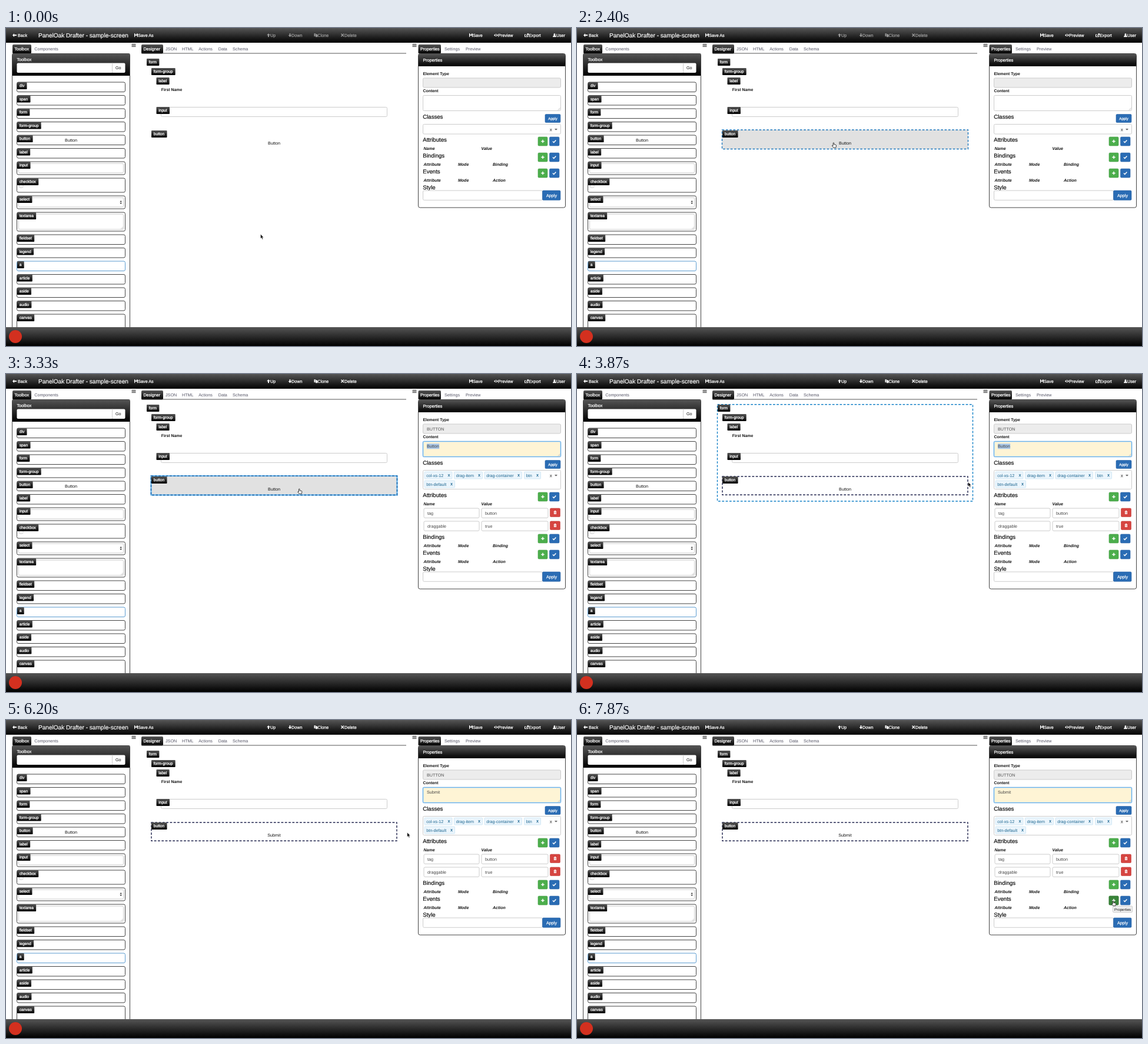
Recreate the animation shown at these times as an HTML page. Size 960 by 540 pixels, loop 8 s.

```html
<!DOCTYPE html>
<html lang="en">
<head>
<meta charset="utf-8">
<title>Screen designer</title>
<style>
html, body { margin: 0; width: 100%; height: 100%; overflow: hidden; background: #fff; }
svg { display: block; width: 960px; height: 540px; }
text { font: 7.2px "Liberation Sans", Arial, sans-serif; fill: currentColor; text-rendering: geometricPrecision; white-space: pre; }
.m { stroke: currentColor; stroke-width: .25px; }
.b { font-weight: bold; font-size: 6.9px; }
.i { font-weight: bold; font-style: italic; font-size: 7px; }
.h { font-size: 9.6px; stroke: currentColor; stroke-width: .2px; }
.t { font-size: 10.08px; stroke: currentColor; stroke-width: .2px; }
.s { font-size: 6.7px; stroke: currentColor; stroke-width: .28px; }
.tip { font-size: 6.2px; }
.mid { text-anchor: middle; }
</style>
</head>
<body>
<svg id="stage" viewBox="0 0 960 540" color="#111"></svg>
<script>
const LOOP = 8000, STEP = 1000 / 15;
const stage = document.getElementById('stage');
const pen = document.createElement('canvas').getContext('2d');
pen.font = '6.7px "Liberation Sans", Arial, sans-serif';

// Drawing helpers that return markup
const text = (x, y, s, cls = '', color = '') =>
  `<text x="${x}" y="${y}" class="${cls}"${color && ` color="${color}"`}>${s}</text>`;
const box = (x, y, x2, y2, fill, line = 'none', r = 0, more = '') =>
  `<rect x="${x}" y="${y}" width="${x2 - x}" height="${y2 - y}" fill="${fill}" stroke="${line}" rx="${r}" ${more}/>`;
const path = (d, x = 0, y = 0, more = '') => `<path d="${d}" transform="translate(${x} ${y})" ${more}/>`;
const group = (id, body, more = '') => `<g id="${id}" ${more}>${body}</g>`;
const field = (x, y, x2, y2, fill = '#fff') => box(x, y, x2, y2, fill, '#ccc', 2);
const grip = (x, y) => path('M0 4L4 0M2 4L4 2', x, y, 'stroke="#aaa" stroke-width=".6"');
const badge = (x, y, s) =>
  box(x, y, x + pen.measureText(s).width + 8, y + 12, 'url(#dark)', 'none', 1) + text(x + 3.7, y + 8.2, s, 's', '#fff');

const icons = {
  back: 'M0 3L3 0V2H7V4H3V6Z',
  save: 'M0 0H5L6 1V6H0ZM1.5 0V2H4V0ZM1.2 3.5V6H4.8V3.5Z',
  up: 'M3 0L6 3H4V6H2V3H0Z',
  down: 'M3 6L0 3H2V0H4V3H6Z',
  clone: 'M0 0H2.5V1H2V5H0ZM2.6 1H4.6L6 2.5V6H2.6Z',
  remove: 'M1 0L2.8 1.8 4.6 0 5.6 1 3.8 2.8 5.6 4.6 4.6 5.6 2.8 3.8 1 5.6 0 4.6 1.8 2.8 0 1Z',
  eye: 'M0 3Q3.5 -1 7 3Q3.5 7 0 3ZM2.2 3A1.3 1.3 0 0 0 4.8 3A1.3 1.3 0 0 0 2.2 3Z',
  share: 'M0 1.5H2.5L2 2.5H1V5H5V4L6 3V6H0ZM4 0H7V3L6 2 3.5 4.3 2.6 3.5 5 1Z',
  user: 'M3 0A1.6 1.7 0 0 1 4 3Q6 4 6 6H0Q0 4 2 3A1.6 1.7 0 0 1 3 0Z',
  trash: 'M0 1H1.5V0H3.5V1H5V1.8H0ZM.5 2.2H4.5V6H.5ZM1.5 3V5.3H2V3ZM3 3V5.3H3.5V3Z'
};
const icon = (name, x, y = 9.3) => path(icons[name], x, y, 'fill="currentColor" fill-rule="evenodd"');
const tool = (name, x, label, tx) => icon(name, x) + text(tx, 15, label, 'm');
const menu = x => path('M0 .5H7M0 2.5H7M0 4.5H7', x, 27, 'stroke="#333"');
const tab = (x, x2, label) => box(x, 28, x2, 43.5, 'url(#dark)', 'none', 2) + text(x + 3.4, 38, label, 'm', '#fff');
const tabs = list => list.map(([x, s]) => text(x, 38, s, '', '#556')).join('');

function chrome() {
  return box(0, 0, 960, 25, 'url(#dark)') + box(0, 508, 960, 540, 'url(#dark)') +
    '<circle cx="16" cy="524" r="11" fill="#d3301f"/>' +
    group('head', tool('back', 11, 'Back', 20) + text(55, 16, 'PanelOak Drafter - sample-screen', 't') +
      tool('save', 218, 'Save As', 224.3) + tool('save', 787, 'Save', 793.3) + tool('eye', 829, 'Preview', 836) +
      tool('share', 881, 'Export', 888) + tool('user', 929, 'User', 935), 'color="#fff"') +
    group('edit', tool('up', 443, 'Up', 449) + tool('down', 479.5, 'Down', 485) +
      tool('clone', 523.5, 'Clone', 529.5) + tool('remove', 569, 'Delete', 575)) +
    menu(213.5) + menu(690.5);
}

function toolbox() {
  const rows = [['div', 92], ['span', 114.5], ['form', 137], ['form-group', 159.5], ['button', 182], ['label', 204.5],
    ['input', 227, 22], ['checkbox', 255, 24], ['select', 285, 22], ['textarea', 313, 32], ['fieldset', 351],
    ['legend', 373.5], ['a', 396], ['article', 418.5], ['aside', 441], ['audio', 463.5], ['canvas', 486, 30]];
  const inner = {
    button: text(110.5, 193, 'Button', 'mid'),
    input: field(21.5, 230, 199.5, 246),
    checkbox: box(22.5, 265, 29, 271, '#fff', '#ccc', 1.5),
    select: field(21.5, 288, 199.5, 304) + path('M0 2.3L1.7 0 3.4 2.3ZM0 3.7L1.7 6 3.4 3.7Z', 193.5, 293, 'fill="#222"'),
    textarea: field(21.5, 316, 199.5, 342) + grip(195, 337.5)
  };
  return tab(11, 43, 'Toolbox') + tabs([[48.2, 'Components']]) +
    path('M10.5 508V45.5Q10.5 43.5 12.5 43.5H208.5Q210.5 43.5 210.5 45.5V508', 0, 0, 'fill="none" stroke="#444"') +
    box(11, 43.5, 210, 81, 'url(#dark)') + text(18.5, 56, 'Toolbox', 'm', '#fff') +
    box(18.5, 59.5, 202.5, 76, '#fff', 'none', 2) + path('M180.5 59.5V76', 0, 0, 'stroke="#ccc"') + text(186, 70.3, 'Go') +
    '<g clip-path="url(#body)">' + rows.map(([name, y, h = 16.5]) =>
      box(18.5, y, 202.5, y + h, '#fff', name === 'a' ? '#5b9bd0' : '#444', 2.5) + (inner[name] || '') +
      badge(19, y, name)).join('') + '</g>';
}

function designer() {
  const area = 'stroke-width="1.4" stroke-dasharray="3.8 2.5"';
  return tab(230, 267, 'Designer') +
    tabs([[271, 'JSON'], [299, 'HTML'], [327.3, 'Actions'], [360.7, 'Data'], [385, 'Schema']]) +
    path('M230 43H680', 0, 0, 'stroke="#555"') +
    group('formHover', box(238.5, 51.8, 672.5, 216, 'none', '#1682c8', 0, area)) +
    group('hover', box(246.5, 173, 664.5, 205.5, '#e1e1e1') + box(246.5, 173, 664.5, 205.5, 'none', '#1f78bd', 0, area)) +
    group('focus', box(246.5, 173, 664.5, 205.5, 'none', '#62b5f2', 0, 'stroke-width="2"') +
      box(246.5, 173, 664.5, 205.5, 'none', '#1f66a5', 0, area)) +
    group('picked', box(247, 174, 664, 205.3, 'none', '#22264f', 0, area)) +
    badge(239, 52, 'form') + badge(247, 68, 'form-group') + badge(255.5, 84, 'label') +
    text(263.7, 106.5, 'First Name', 'b') + field(263.5, 134.5, 647.5, 150.5) + badge(255.5, 134, 'input') +
    badge(247, 174, 'button') + `<text id="label" x="455.5" y="198" class="mid"></text>`;
}

const blue = (x, y, x2, y2) => box(x, y, x2, y2, '#2a6cb4', '#2560a3', 1.5, 'stroke-width=".6"');
function pair(y) {
  return box(904, y, 920, y + 15, '#4cae4c', '#449d44', 1.5, 'stroke-width=".6"') +
    path('M-2.7 0H2.7M0 -2.7V2.7', 912, y + 7.4, 'stroke="#fff" stroke-width="1.5"') +
    blue(923.5, y, 940, y + 15) +
    path('M-2.6 0L-.8 2 2.8 -2', 931.6, y + 7.4, 'stroke="#fff" stroke-width="1.5" fill="none"');
}
function section(y, title, heads) {
  return text(708.3, y, title, 'h') + pair(y - 8) +
    heads.map(([x, s]) => text(x, y + 14, s, 'i')).join('');
}
const chip = (x, y, x2, s) => box(x, y, x2, y + 12, '#ebf5fc', '#c5e1f3', 1, 'stroke-width=".7"') +
  text(x + 3.2, y + 8.5, s, '', '#1b658f') + text(x2 - 7.3, y + 8.3, 'x', 'm', '#1b658f');
const attr = (y, name, value) => field(710, y, 804, y + 16.3) + field(808, y, 921, y + 16.3) +
  text(716, y + 10.8, name, '', '#444') + text(814, y + 10.8, value, '', '#444') +
  box(924.5, y, 941.5, y + 14.5, '#d64541', '#c23a36', 1.5, 'stroke-width=".6"') +
  `<g color="#fff">${icon('trash', 930.5, y + 4)}</g>`;

function panel(full) {
  const a = full ? 16 : 0, b = full ? 60 : 0;
  const cols = last => [[709.5, 'Attribute'], [768, 'Mode'], [827, last]];
  return box(700.5, 43.5, 950.5, 305 + b, '#fff', '#444', 3) + box(701, 44, 950, 65, 'url(#dark)') +
    text(708.5, 57, 'Properties', 'm', '#fff') +
    text(708.5, 79.5, 'Element Type', 'b') + field(708.5, 85, 942.5, 101, '#ececec') +
    text(708.5, 109, 'Content', 'b') +
    (full ? box(708.5, 114.5, 942.5, 140.5, '#fef4d5', '#bcdcf5', 2, 'stroke-width="2.2"') +
      box(708.5, 114.5, 942.5, 140.5, 'none', '#66afe9', 2) : field(708.5, 114.5, 942.5, 140.5)) + grip(937.5, 135.5) +
    text(708.3, 154.3, 'Classes', 'h') + blue(916, 146.5, 942, 160.5) + text(929, 156, 'Apply', 'mid tip m', '#fff') +
    field(708.5, 163.5, 942.5, full ? 195.5 : 180) + text(924, 175, 'x', 'm', '#555') +
    path('M0 0H5L2.5 2.7Z', 932, 171, 'fill="#666"') +
    section(193 + a, 'Attributes', [[709.5, 'Name'], [807.5, 'Value']]) +
    section(220 + b, 'Bindings', cols('Binding')) + section(247 + b, 'Events', cols('Action')) +
    text(708.3, 274 + b, 'Style', 'h') + field(708.5, 276 + b, 911.5, 292.3 + b) +
    blue(911.5, 276 + b, 942, 292.3 + b) + text(927, 287 + b, 'Apply', 'mid m', '#fff') +
    (full ? text(715, 95.5, 'BUTTON', '', '#555') +
      chip(711, 166, 758, 'col-xs-12') + chip(761.5, 166, 809.5, 'drag-item') + chip(813, 166, 876.5, 'drag-container') +
      chip(880.5, 166, 908.5, 'btn') + chip(711, 181, 762.5, 'btn-default') +
      attr(228, 'tag', 'button') + attr(250, 'draggable', 'true') : '');
}

stage.innerHTML = `<defs>
  <linearGradient id="dark" x2="0" y2="1"><stop stop-color="#555"/><stop offset="1"/></linearGradient>
  <clipPath id="body"><rect width="960" height="508"/></clipPath></defs>` +
  box(0, 0, 960, 540, '#fff') + chrome() + toolbox() + designer() +
  tab(700.5, 739, 'Properties') + tabs([[745, 'Settings'], [781, 'Preview']]) +
  group('empty', panel(false)) +
  group('filled', panel(true) + group('selection', box(715, 118.3, 736.2, 127.2, '#a9c6e6')) +
    `<text id="content" x="715" y="125" color="#444"></text>` +
    group('caret', path('M738.3 118V127.3', 0, 0, 'stroke="#222" stroke-width=".8"')) +
    group('plusHover', box(904, 299, 920, 314, '#398439', '#2d6b2d', 1.5, 'stroke-width=".6"') +
      path('M-2.7 0H2.7M0 -2.7V2.7', 912, 306.4, 'stroke="#fff" stroke-width="1.5"'))) +
  group('tip', box(910.5, 316, 943.5, 326.5, '#efefef', '#bbb', 1, 'stroke-width=".7"') + text(913, 323.5, 'Properties', 'tip')) +
  group('cursor', group('arrow', path('M0 0V7.6L1.7 6.1 2.9 8.9 4.2 8.3 3 5.7H5.2Z', 0, 0, 'fill="#000" stroke="#fff" stroke-width=".5"')) +
    group('hand', path('M-.8 .8Q0 -.5 .8 .8V3.3L4 4Q4.8 4.3 4.6 5.5L4 8.6H-.2L-2.6 5.4Q-2.2 4.3 -.8 5.4Z', 0, 0,
      'fill="#fff" stroke="#111" stroke-width=".8" stroke-linejoin="round"')));

const $ = Object.fromEntries([...stage.querySelectorAll('[id]')].map(e => [e.id, e]));
const show = (id, on) => $[id].style.display = on ? '' : 'none';

// Pointer stops: time, x, y
const stops = [[0, 432.5, 350], [133, 432.5, 350], [533, 376, 195], [600, 376, 195], [1267, 439.5, 193.5],
  [2333, 439.5, 193.5], [2533, 426, 197], [3200, 426, 197], [3600, 703, 188], [3867, 664.6, 183.5],
  [6134, 664.6, 183.5], [6533, 896, 283.5], [6600, 896, 283.5], [7467, 911, 307], [LOOP, 911, 307]];
function pointer(t) {
  const k = stops.findIndex(s => s[0] > t);
  const [t0, x0, y0] = stops[k - 1], [t1, x1, y1] = stops[k];
  const u = (t - t0) / (t1 - t0), e = u * u * (3 - 2 * u);
  return [x0 + (x1 - x0) * e, y0 + (y1 - y0) * e];
}
const keys = [4800, 4930, 5070, 5130, 5270, 5400];

function draw(now) {
  const t = Math.floor((now % LOOP + 4) / STEP) * STEP % LOOP + .5;
  const [x, y] = pointer(t);
  const full = t > 2866, typed = keys.filter(k => k <= t + 4).length;
  const word = typed ? 'Submit'.slice(0, typed) : 'Button';
  const over = t > 2399 && x < 664 && y < 206;
  const plus = x > 904 && y > 299;

  $.edit.setAttribute('color', full ? '#fff' : '#999');
  show('empty', !full);
  show('filled', full);
  show('hover', over);
  show('focus', over && t > 2799);
  show('picked', full && !over);
  show('formHover', t > 3200 && !over && x < 673);
  $.label.textContent = $.content.textContent = word;
  show('selection', !typed);
  show('caret', typed && (t < 5860 || Math.floor((t - 5865) / 500) % 2));
  $.caret.setAttribute('transform', `translate(${$.content.getComputedTextLength() - 22.8})`);
  show('plusHover', plus);
  show('tip', t > 7733);
  show('cursor', t < 4799 || t > 6199);
  show('arrow', !over && !plus);
  show('hand', over || plus);
  $.cursor.setAttribute('transform', `translate(${x} ${y})`);
}

const start = performance.now();
function tick() {
  draw(performance.now() - start);
  requestAnimationFrame(tick);
}
tick();
</script>
</body>
</html>
```
